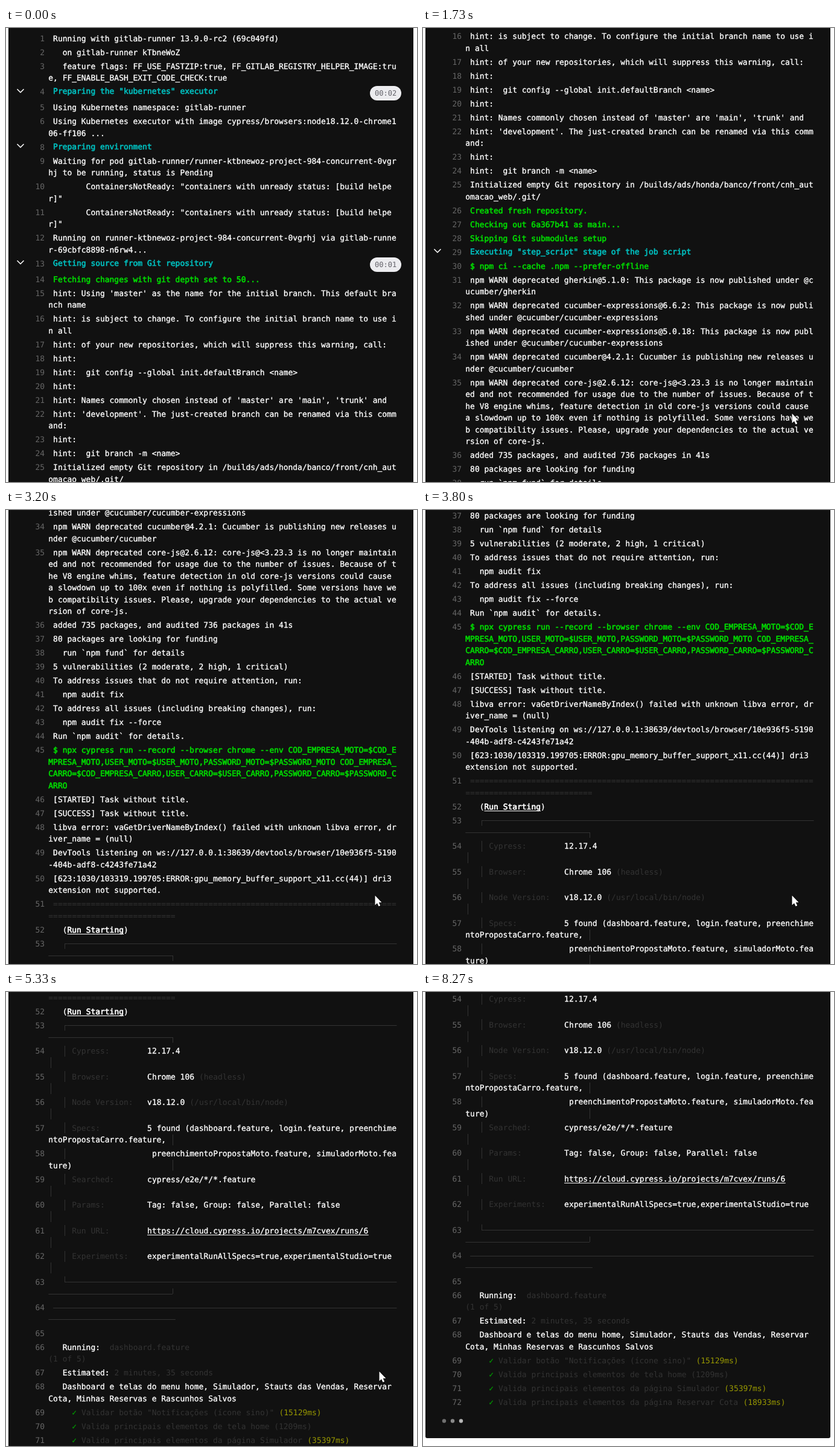
An HTML page with a canvas that plays this animation: 681x752 px, repeating every 8340 ms.

```html
<!DOCTYPE html>
<html lang="en">
<head>
<meta charset="utf-8">
<title>Job log</title>
<style>
html, body { margin: 0; width: 100%; height: 100%; overflow: hidden; background: #fff; }
canvas { display: block; }
</style>
</head>
<body>
<canvas id="stage" width="681" height="752"></canvas>
<script>
const ctx = document.getElementById('stage').getContext('2d');
const LOOP = 8340, WIDTH = 681, HEIGHT = 752;
const COLS = 74, CELL = 7.8, LEFT = 70.3, ROW = 19.5, GAP = 3.5;
const FONT_SIZE = 12.956, FAMILY = '"DejaVu Sans Mono", monospace';

// Style marks: § followed by one of these keys. "bold" is extra stroke width.
const STYLES = {
  w: { color: '#fff', bold: 0.35 },
  c: { color: '#00bdbd', bold: 0.7 },
  G: { color: '#00d600', bold: 0.7 },
  g: { color: '#009900', bold: 0.2 },
  y: { color: '#999900', bold: 0 },
  d: { color: '#333', bold: 0 },
  u: { color: '#fff', bold: 0.35, underline: true },
  b: { color: '#fff', bold: 0.7, underline: true }
};

const info = (label, value, end = '\n§d│') => `  §d│ ${label.padEnd(16)}§w${value}${end}`;
const check = (text, time) => `    §g✓ §d${text} ${time}`;
const warn = text => 'npm WARN deprecated ' + text;
const notReady = '       ContainersNotReady: "containers with unready status: [build helpe\nr]"';

const LOG = [
  'Running with gitlab-runner 13.9.0-rc2 (69c049fd)',
  '  on gitlab-runner kTbneWoZ',
  '  feature flags: FF_USE_FASTZIP:true, FF_GITLAB_REGISTRY_HELPER_IMAGE:true, FF_ENABLE_BASH_EXIT_CODE_CHECK:true',
  '§cPreparing the "kubernetes" executor',
  'Using Kubernetes namespace: gitlab-runner',
  'Using Kubernetes executor with image cypress/browsers:node18.12.0-chrome106-ff106 ...',
  null,
  '§cPreparing environment',
  'Waiting for pod gitlab-runner/runner-ktbnewoz-project-984-concurrent-0vgrhj to be running, status is Pending',
  notReady,
  notReady,
  'Running on runner-ktbnewoz-project-984-concurrent-0vgrhj via gitlab-runner-69cbfc8898-n6rw4...',
  '§cGetting source from Git repository',
  '§GFetching changes with git depth set to 50...',
  "hint: Using 'master' as the name for the initial branch. This default branch name",
  'hint: is subject to change. To configure the initial branch name to use in all',
  'hint: of your new repositories, which will suppress this warning, call:',
  'hint:',
  'hint:  git config --global init.defaultBranch <name>',
  'hint:',
  "hint: Names commonly chosen instead of 'master' are 'main', 'trunk' and",
  "hint: 'development'. The just-created branch can be renamed via this command:",
  'hint:',
  'hint:  git branch -m <name>',
  'Initialized empty Git repository in /builds/ads/honda/banco/front/cnh_automacao_web/.git/',
  '§GCreated fresh repository.',
  '§GChecking out 6a367b41 as main...',
  '§GSkipping Git submodules setup',
  '§cExecuting "step_script" stage of the job script',
  '§G$ npm ci --cache .npm --prefer-offline',
  warn('gherkin@5.1.0: This package is now published under @cucumber/gherkin'),
  warn('cucumber-expressions@6.6.2: This package is now published under @cucumber/cucumber-expressions'),
  warn('cucumber-expressions@5.0.18: This package is now published under @cucumber/cucumber-expressions'),
  warn('cucumber@4.2.1: Cucumber is publishing new releases under @cucumber/cucumber'),
  warn('core-js@2.6.12: core-js@<3.23.3 is no longer maintained and not recommended for usage due to the number of issues. Because of the V8 engine whims, feature detection in old core-js versions could cause a slowdown up to 100x even if nothing is polyfilled. Some versions have web compatibility issues. Please, upgrade your dependencies to the actual version of core-js.'),
  'added 735 packages, and audited 736 packages in 41s',
  '80 packages are looking for funding',
  '  run `npm fund` for details',
  '5 vulnerabilities (2 moderate, 2 high, 1 critical)',
  'To address issues that do not require attention, run:',
  '  npm audit fix',
  'To address all issues (including breaking changes), run:',
  '  npm audit fix --force',
  'Run `npm audit` for details.',
  '§G$ npx cypress run --record --browser chrome --env COD_EMPRESA_MOTO=$COD_EMPRESA_MOTO,USER_MOTO=$USER_MOTO,PASSWORD_MOTO=$PASSWORD_MOTO COD_EMPRESA_CARRO=$COD_EMPRESA_CARRO,USER_CARRO=$USER_CARRO,PASSWORD_CARRO=$PASSWORD_CARRO',
  '[STARTED] Task without title.',
  '[SUCCESS] Task without title.',
  'libva error: vaGetDriverNameByIndex() failed with unknown libva error, driver_name = (null)',
  'DevTools listening on ws://127.0.0.1:38639/devtools/browser/10e936f5-5190-404b-adf8-c4243fe71a42',
  '[623:1030/103319.199705:ERROR:gpu_memory_buffer_support_x11.cc(44)] dri3 extension not supported.',
  '§d' + '='.repeat(100),
  '  (§bRun Starting§w)',
  '  §d┌' + '─'.repeat(96) + '┐',
  info('Cypress:', '12.17.4'),
  info('Browser:', 'Chrome 106 §d(headless)'),
  info('Node Version:', 'v18.12.0 §d(/usr/local/bin/node)'),
  info('Specs:', '5 found (dashboard.feature, login.feature, preenchimentoPropostaCarro.feature, ', '§d│'),
  info('', ' preenchimentoPropostaMoto.feature, simuladorMoto.feature)', ' '.repeat(21) + '§d│'),
  info('Searched:', 'cypress/e2e/*/*.feature'),
  info('Params:', 'Tag: false, Group: false, Parallel: false'),
  info('Run URL:', '§uhttps://cloud.cypress.io/projects/m7cvex/runs/6'),
  info('Experiments:', 'experimentalRunAllSpecs=true,experimentalStudio=true'),
  '  §d└' + '─'.repeat(96) + '┘',
  '§d' + '─'.repeat(100),
  '',
  '  Running:  §ddashboard.feature\n(1 of 5)',
  '  Estimated: §d2 minutes, 35 seconds',
  '  Dashboard e telas do menu home, Simulador, Stauts das Vendas, Reservar Cota, Minhas Reservas e Rascunhos Salvos',
  check('Validar botão "Notificações (ícone sino)"', '§y(15129ms)'),
  check('Valida principais elementos de tela home', '(1209ms)'),
  check('Valida principais elementos da página Simulador', '§y(35397ms)'),
  check('Valida principais elementos da página Reservar Cota', '§y(18933ms)')
];
const DURATIONS = { 4: '00:02', 13: '00:01' };
const PANEL_END = 2473, DOTS_Y = 2444.5;

// Break a marked line into runs of one style on one row.
function layout(text) {
  const runs = [];
  let style = 'w', row = 0, col = 0, run = null;
  const chars = [...(' ' + text)];
  for (let i = 0; i < chars.length; i++) {
    const ch = chars[i];
    if (ch === '§') { style = chars[++i]; run = null; continue; }
    if (ch === '\n') { row++; col = 0; run = null; continue; }
    if (col === COLS) { row++; col = 0; run = null; }
    if (!run) runs.push(run = { style: STYLES[style], row, col, text: '' });
    run.text += ch;
    col++;
  }
  return { runs, rows: row + 1 };
}

const entries = [];
let nextY = 17;
LOG.forEach((text, i) => {
  if (text === null) return;
  const number = i + 1, duration = DURATIONS[number];
  const entry = { number, duration, y: nextY, header: text.startsWith('§c'), ...layout(text) };
  entries.push(entry);
  nextY += entry.rows * ROW + GAP + (duration ? 3 : 0);
});

// Each wheel notch: start time, distance, duration.
const NOTCH = 206;
const SCROLLS = [
  [260, NOTCH, 350], [932, NOTCH, 350], [1610, NOTCH, 350], [2267, NOTCH, 350],
  [2956, NOTCH, 350], [3545, NOTCH, 370], [4228, NOTCH, 350], [4880, NOTCH, 260],
  [5410, 86, 350]
];
const smooth = u => u * u * (3 - 2 * u);
const clamp01 = u => Math.min(1, Math.max(0, u));
const scrollAt = t => Math.round(
  SCROLLS.reduce((sum, [start, dist, dur]) => sum + dist * smooth(clamp01((t - start) / dur)), 0));

// Pointer stops: time, x, y; without a place it is hidden.
const POINTER = [
  [0], [70, 669, 632], [130, 608, 640], [330, 610, 640], [1470], [1670, 611, 638],
  [4730, 600, 629], [5270, 609, 629], [5330, 618, 628], [6870]
];

function drawText(text, x, y, { color, bold }, size = FONT_SIZE) {
  ctx.font = `${size}px ${FAMILY}`;
  ctx.fillStyle = ctx.strokeStyle = color;
  ctx.fillText(text, x, y);
  if (!bold) return;
  ctx.lineWidth = bold;
  ctx.strokeText(text, x, y);
}

function drawRule(ch, x, y) {
  const mid = Math.floor(x + CELL / 2), line = Math.round(y);
  if (ch === '│') return ctx.fillRect(mid, line - 9, 1, 18);
  if (ch === '┌' || ch === '┐') ctx.fillRect(mid, line, 1, 9);
  else ctx.fillRect(mid, line - 9, 1, 9);
  if (ch === '┌' || ch === '└') ctx.fillRect(mid, line, x + CELL - mid, 1);
  else ctx.fillRect(x, line, mid - x, 1);
}

function drawRun({ style, row, col, text }, top) {
  const x = LEFT + col * CELL, y = top + row * ROW;
  const baseline = Math.round(y + 4.6);
  drawText(text.replace(/[─│┌┐└┘]/g, ' '), x, baseline, style);
  for (const m of text.matchAll(/─+|[│┌┐└┘]/g)) {
    const ruleX = x + m.index * CELL;
    if (m[0][0] === '─') ctx.fillRect(ruleX, Math.round(y), m[0].length * CELL, 1);
    else drawRule(m[0], ruleX, y);
  }
  if (style.underline) ctx.fillRect(x, baseline + 2, text.length * CELL, 1);
}

function drawChevron(y) {
  ctx.strokeStyle = '#fff';
  ctx.lineWidth = 1.6;
  ctx.beginPath();
  ctx.moveTo(18.5, y - 2.7);
  ctx.lineTo(24, y + 2.8);
  ctx.lineTo(29.5, y - 2.7);
  ctx.stroke();
}

function drawBadge(text, y) {
  ctx.fillStyle = '#ececef';
  ctx.beginPath();
  ctx.roundRect(603, y - 12, 52, 24, 12);
  ctx.fill();
  drawText(text, 611, y + 4, { color: '#626168', bold: 0 }, 12);
}

function drawEntry(entry, scroll) {
  const y = entry.y - scroll;
  if (y > HEIGHT + 20 || y + entry.rows * ROW < -20) return;
  ctx.textAlign = 'right';
  drawText(entry.number, 64, Math.round(y + 4.6), { color: '#666', bold: 0 });
  ctx.textAlign = 'left';
  const top = entry.header ? y - 1 : y;
  entry.runs.forEach(run => drawRun(run, top));
  if (entry.header) drawChevron(Math.round(y - 2));
  if (entry.duration) drawBadge(entry.duration, Math.round(y + 2));
}

function drawDots(t, y) {
  for (let i = 0; i < 3; i++) {
    const phase = (t / 1000 + 1.27 - i / 3) % 1;
    const edge = Math.min(phase, 1 - phase, 0.25);
    ctx.fillStyle = `rgba(255, 255, 255, ${1 - 2.4 * edge})`;
    ctx.beginPath();
    ctx.arc(35 + 14 * i, y, 3.2, 0, Math.PI * 2);
    ctx.fill();
  }
}

function drawPointer(t) {
  const [, x, y] = POINTER.filter(stop => stop[0] <= t).pop();
  if (x === undefined) return;
  ctx.save();
  ctx.translate(x, y);
  const arrow = new Path2D('M.5 .5V16.5L4 13.2L6.5 18.5L9.2 17.3L6.8 12H11.5Z');
  ctx.strokeStyle = '#000';
  ctx.lineWidth = 1.5;
  ctx.stroke(arrow);
  ctx.fillStyle = '#fff';
  ctx.fill(arrow);
  ctx.restore();
}

function draw(t) {
  const scroll = scrollAt(t);
  ctx.fillStyle = '#fff';
  ctx.fillRect(0, 0, WIDTH, HEIGHT);
  ctx.fillStyle = '#111';
  ctx.beginPath();
  ctx.roundRect(4, -20, 671, PANEL_END - scroll + 20, 3);
  ctx.fill();
  entries.forEach(entry => drawEntry(entry, scroll));
  drawDots(t, DOTS_Y - scroll);
  drawPointer(t);
}

// Fifteen pictures a second, on a 10 ms clock.
function quantize(t) {
  const rest = t % 200;
  return t - rest + (rest >= 130 ? 130 : rest >= 70 ? 70 : 0);
}

ctx.textRendering = 'geometricPrecision';
ctx.lineJoin = 'round';
const began = performance.now();
function tick() {
  draw(quantize((performance.now() - began) % LOOP));
  requestAnimationFrame(tick);
}
tick();
</script>
</body>
</html>
```
